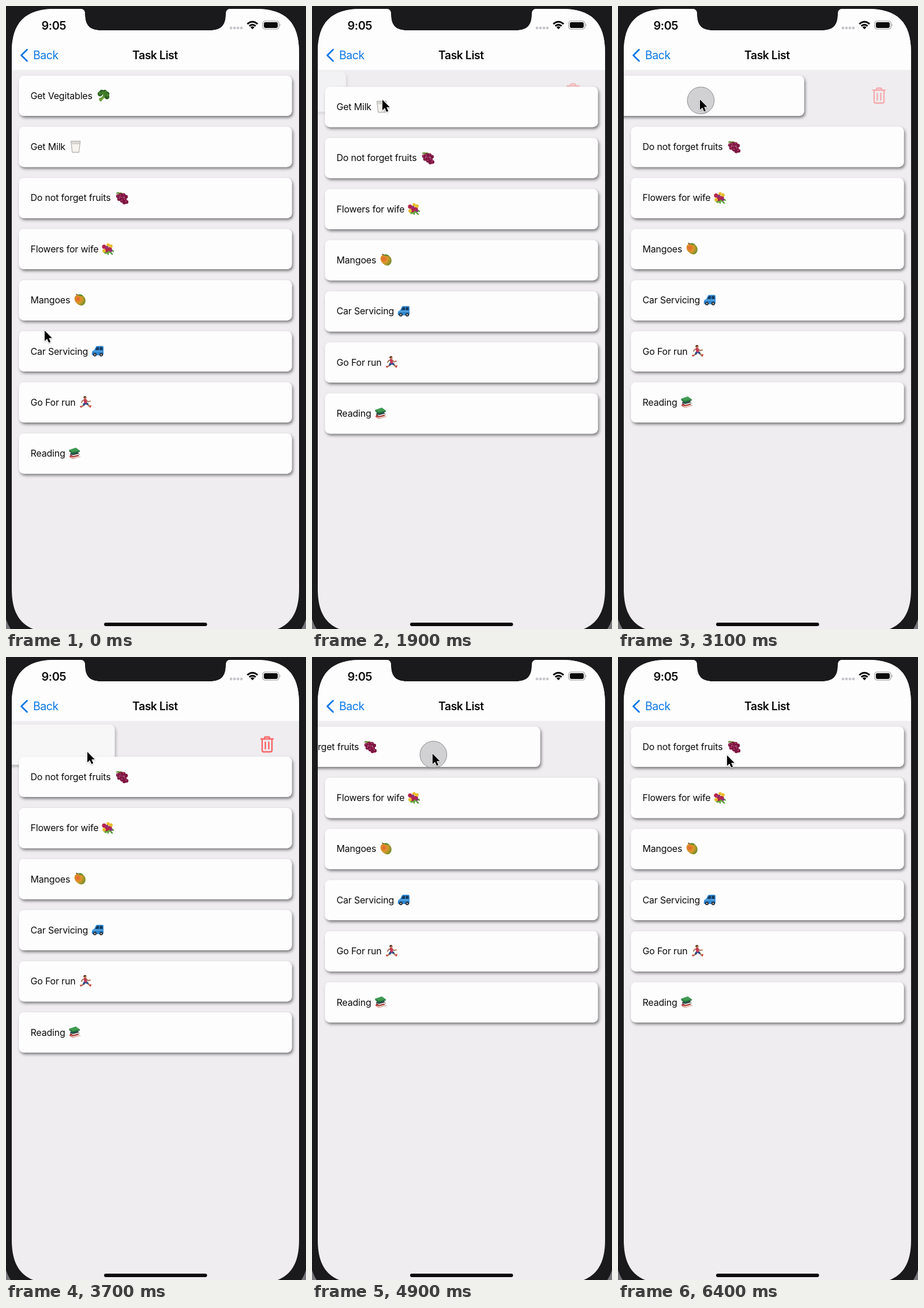
Write an HTML page that moves like this. It is 520 by 1077 pixels and loops after 6700 ms.

```html
<!DOCTYPE html>
<html lang="en">
<head>
<meta charset="utf-8">
<title>Task List</title>
<style>
  html, body { margin: 0; width: 100%; height: 100%; overflow: hidden; background: #1a191b; }
  svg { display: block; width: 100vw; height: 100vh; }
  text { font-family: Inter, Roboto, sans-serif; fill: #0b0b0c; white-space: pre; }
  .label { font-size: 16px; letter-spacing: -.2px; }
</style>
</head>
<body>
<svg viewBox="0 0 520 1077">
  <defs>
    <clipPath id="screen">
      <path d="M10 80C10 28.500 33.500 5 85 5H129Q137 5 137 14C137 33 145 42 164 42H354C373 42 381 33 381 14Q381 5 389 5H433C484.500 5 508 28.500 508 80V1008C508 1059.500 484.500 1083 433 1083H85C33.500 1083 10 1059.500 10 1008Z"/>
    </clipPath>
    <filter id="shade" x="-5%" y="-20%" width="110%" height="150%">
      <feDropShadow dx="2" dy="3" stdDeviation="2.4" flood-color="#000" flood-opacity=".5"/>
    </filter>
    <filter id="soft" x="-50%" y="-50%" width="200%" height="200%">
      <feDropShadow dx="0" dy="1" stdDeviation="1" flood-opacity=".3"/>
    </filter>
    <radialGradient id="mangoSkin" cx=".3" cy=".4" r=".8">
      <stop offset="0" stop-color="#e8622c"/><stop offset=".45" stop-color="#d99a2b"/><stop offset="1" stop-color="#5c8a26"/>
    </radialGradient>
  </defs>

  <rect width="520" height="1077" fill="#1a191b"/>
  <path d="M0 1060Q3 1069 8 1077H0ZM520 1060Q517 1069 512 1077H520Z" fill="#77767a"/>

  <g clip-path="url(#screen)">
    <rect width="520" height="1077" fill="#efedf0"/>
    <g id="list"></g>
    <rect width="520" height="110.500" fill="#fefdfe"/>
    <text x="61.500" y="40.500" font-size="20" font-weight="600" letter-spacing="-.5">9:05</text>
    <g fill="#c6c5c9">
      <circle cx="390" cy="38" r="2.400"/><circle cx="396" cy="38" r="2.400"/>
      <circle cx="402" cy="38" r="2.400"/><circle cx="408" cy="38" r="2.400"/>
    </g>
    <g fill="none" stroke="#0b0b0c" stroke-width="3">
      <path d="M418.300 31.200Q427.200 23.400 436.100 31.200M421.700 34.700Q427.200 30 432.700 34.700"/>
      <path d="M423.800 36.700Q427.200 34 430.600 36.700L427.200 40.200Z" fill="#0b0b0c" stroke="none"/>
    </g>
    <rect x="445" y="26" width="28" height="14" rx="4" fill="none" stroke="#98979a" stroke-width="1.200"/>
    <rect x="447" y="28" width="24" height="10" rx="2.400" fill="#0b0b0c"/>
    <path d="M474.500 30.800Q477 33 474.500 35.200Z" fill="#98979a"/>
    <path d="M36.500 75.500L26.500 85.200L36.500 95" fill="none" stroke="#0b78e6" stroke-width="2.800" stroke-linecap="round" stroke-linejoin="round"/>
    <text x="47" y="92.300" font-size="19.500" letter-spacing="-.45" style="fill:#0b78e6">Back</text>
    <text x="219" y="92.300" font-size="19.500" font-weight="600" letter-spacing="-.5">Task List</text>
    <rect x="170" y="1066" width="178.500" height="6" rx="3" fill="#0b0b0c"/>
  </g>

  <circle id="touch" r="23.300" fill="#aeacb0" fill-opacity=".55" stroke="#8d8b8f" stroke-width="1"/>
  <path id="arrow" d="M0 0V18.200L4.200 14.200L7.200 21L10.200 19.700L7.300 13.100H12.800Z" fill="#000" stroke="#fff" stroke-width="2" stroke-linejoin="round" paint-order="stroke" filter="url(#soft)"/>
</svg>

<script>
const LOOP = 6700, TIMING = 300;
const TOP = 111.1, MARGIN = 9.4, PITCH = 88.35, WIDTH = 498;
const $ = id => document.getElementById(id);

const dots = (color, r, pts) =>
  pts.map(([x, y]) => `<circle cx="${x}" cy="${y}" r="${r}" fill="${color}"/>`).join('');
const path = (d, fill) => `<path d="${d}" fill="${fill}"/>`;
const line = (d, color, w) =>
  `<path d="${d}" fill="none" stroke="${color}" stroke-width="${w}" stroke-linecap="round" stroke-linejoin="round"/>`;

// Small pictures, each about 22 px wide and centred on 0,0
const broccoli =
  path('M-8 5Q-2 3 0-3L6 1Q0 4-4 10Q-8 10-8 5Z', '#6f9f3d') +
  dots('#2c5f22', 4.2, [[-6, -3], [-3, -6], [2, -6], [6, -3], [6, 2]]) +
  dots('#437f2e', 2.6, [[-6, -4], [-1, -5], [4, -6], [7, -1], [2, -1]]);
const milk =
  path('M-8.500-10H8L5.500 10H-6Z', '#d9d8d4') +
  path('M-6.800-5H6.300L4.600 8.500H-5.100Z', '#f6f4ee') +
  line('M-8.300-9.800H7.800L5.400 9.800H-5.900Z', '#b1afab', 1) +
  line('M-6.500-5H6', '#c9c6be', 1);
const grapes =
  line('M-9-8Q-5-10-3-6', '#5f7f2c', 2) +
  path('M-8-7Q-2-12 3-7Q-2-3-8-7Z', '#6e8f35') +
  dots('#7d1742', 3.2, [[-7, -3], [-2, -5], [3, -5], [7, -2], [-5, 2], [0, 0], [5, 3], [0, 5], [8, 7], [4, 8]]) +
  dots('#b23a6b', 1.3, [[-8, -4], [-3, -5], [3, -6], [-5, 1], [0, -1], [5, 2], [0, 4], [7, 6]]);
const flowers =
  line('M-2-2L8 9M0 0L1 9M2-1L10 4', '#4f9a33', 2.4) +
  path('M-9 4L4-3L6 6L-4 9Z', '#6aa73c') +
  dots('#b3244f', 3.6, [[-6, -4], [-2, 2], [4, 0]]) +
  dots('#e9bd2c', 2.9, [[1, -7], [6, -5], [-6, 3]]) +
  dots('#8a2f78', 2.4, [[-1, -3], [6, 3]]);
const mango =
  path('M-9-5C-7-11 3-11 8-5C12 1 9 9 3 9.500C-4 9-11 2-9-5Z', 'url(#mangoSkin)') +
  line('M-4-9L-6-10', '#5a4322', 1.6) + path('M-4-9Q2-12 6-7Q0-6-4-9Z', '#5d8c2b');
const car =
  path('M-10 3Q-10-1-6-2L-3-8Q-2-9 0-9H8Q10-9 10-6V5Q10 7 8 7H-9Q-11 6-10 3Z', '#2f86cf') +
  path('M-4-2L-1.500-7H2V-2ZM3.500-7H8L8.500-2H3.500Z', '#16385a') +
  line('M-9 0H9', '#69b5ec', 1.2) +
  dots('#222428', 3, [[-5, 6], [6, 6]]) + dots('#b9bec4', 1.3, [[-5, 6], [6, 6]]);
const runner =
  line('M0 1L4 4L8 8M-1 1L-3 5L-8 8', '#a97452', 2.6) +
  line('M0-4L-5-3L-7 0M1-4L4-1L8-2', '#a97452', 2) +
  line('M0 1L3 3M-1 1L-3 4', '#2f4f8c', 3.6) +
  line('M-1-4L0 0', '#c73655', 4.600) +
  line('M8 8L9 6M-8 8L-9 7', '#d9403c', 2) +
  dots('#b9805c', 2.7, [[-1, -8]]) + path('M-4-8Q-3-12 1-10L-1-8Z', '#4a2f20');
const books =
  path('M-8 3L4 1L10 6L-3 9.500L-9 6Z', '#b3322e') + path('M-8 5L-3 7L9 4V6L-3 9Z', '#f0e7dc') +
  path('M-7-1L5-3L9 2L-3 5L-8 2Z', '#2d3f4c') + path('M-7 1L-3 3L8 0V2L-3 5Z', '#e9dfd2') +
  path('M-10-6L2-10L9-5L-3-1Z', '#3f9a52') + path('M-10-6L-3-2L9-5V-3L-3 1L-9-3Z', '#24703a');

const tasks = [
  ['Get Vegitables', 169, broccoli], ['Get Milk', 121, milk],
  ['Do not forget fruits', 201, grapes], ['Flowers for wife', 176, flowers],
  ['Mangoes', 128, mango], ['Car Servicing', 159, car],
  ['Go For run', 138, runner], ['Reading', 119, books]
];

const trash = line('M-10.500-9.500H10.500M-5-10L-3.500-13H3.500L5-10M-8.500-9V10Q-8.500 12.800-5.700 12.800H5.700Q8.500 12.800 8.500 10V-9M-3-4V7.500M3-4V7.500', '#f00', 2.4);

$('list').innerHTML = tasks.map(([label, x, art]) => `<g>
  <g transform="translate(452.500 34.500)">${trash}</g>
  <g>
    <rect x="22.500" width="473" height="69.500" rx="8.500" fill="#fefdfe" filter="url(#shade)"/>
    <text class="label" x="42.500" y="40.300">${label}</text>
    <g transform="translate(${x} 34.500)">${art}</g>
  </g></g>`).join('');
const rows = [...$('list').children].map(box => ({ box, icon: box.children[0], card: box.children[1] }));

// Pointer path: time, x, y
const pointer = [
  [0, 67, 561], [400, 347, 246], [520, 347, 246], [700, 348, 178], [980, 348, 178],
  [1400, 199, 159], [1680, 122, 162], [2110, 122, 162], [2420, 325, 161], [2500, 325, 161],
  [3100, 142, 161.5], [3250, 141, 162], [3700, 141, 164], [3920, 141, 164], [4320, 319, 166],
  [4420, 319, 166], [4900, 209, 167], [5150, 189, 169], [5500, 189, 170], [LOOP, 189, 170]
];

// One swipe per leading row; `warn` is when the bin starts to show
const swipes = [
  { down: 980, up: 1700, from: 338, warn: 1430, removes: true },
  { down: 2480, up: 3565, from: 315, warn: 2988, removes: true },
  { down: 4400, up: 5550, from: 309, warn: Infinity, removes: false }
];

const ease = p => p <= 0 ? 0 : p >= 1 ? 1 : p < .5 ? 2 * p * p : 1 - 2 * (1 - p) ** 2;
const timing = (t, start) => ease((t - start) / TIMING);

// Monotone cubic through the pointer path, so holds stay still
function track(t, k) {
  const slope = i => pointer[i] && pointer[i + 1]
    ? (pointer[i + 1][k] - pointer[i][k]) / (pointer[i + 1][0] - pointer[i][0]) : 0;
  const tangent = i => {
    const a = slope(i - 1), b = slope(i);
    return a * b <= 0 ? 0 : 2 * a * b / (a + b);
  };
  let i = 0;
  while (i < pointer.length - 2 && t >= pointer[i + 1][0]) i++;
  const [a, b] = [pointer[i], pointer[i + 1]], h = b[0] - a[0], p = (t - a[0]) / h, q = 1 - p;
  return a[k] * (1 + 2 * p) * q * q + b[k] * p * p * (3 - 2 * p)
    + h * (tangent(i) * p * q * q - tangent(i + 1) * p * p * q);
}

function slide(s, t) {
  if (t < s.down) return 0;
  const drag = Math.min(0, track(Math.min(t, s.up), 1) - s.from);
  const goal = s.removes ? -WIDTH : 0;
  return drag + (goal - drag) * timing(t, s.up);
}

function draw(t) {
  let y = TOP;
  rows.forEach(({ box, icon, card }, i) => {
    const s = swipes[i];
    const gone = s && s.removes ? timing(t, s.up) : 0;
    box.setAttribute('transform', `translate(0 ${y + MARGIN * (1 - gone)})`);
    box.setAttribute('opacity', 1 - gone);
    box.style.display = gone === 1 ? 'none' : '';
    icon.setAttribute('opacity', s ? timing(t, s.warn) : 0);
    card.setAttribute('transform', `translate(${s ? slide(s, t) : 0} 0)`);
    y += PITCH * (1 - gone);
  });
  const px = track(t, 1), py = track(t, 2);
  const pressed = swipes.some(s => t >= s.down && t < s.up);
  $('arrow').setAttribute('transform', `translate(${px} ${py})`);
  $('touch').setAttribute('transform', `translate(${px + 1.5} ${py + 1.8})`);
  $('touch').style.display = pressed ? '' : 'none';
}

function loop() {
  draw(performance.now() % LOOP);
  requestAnimationFrame(loop);
}
loop();
</script>
</body>
</html>
```
